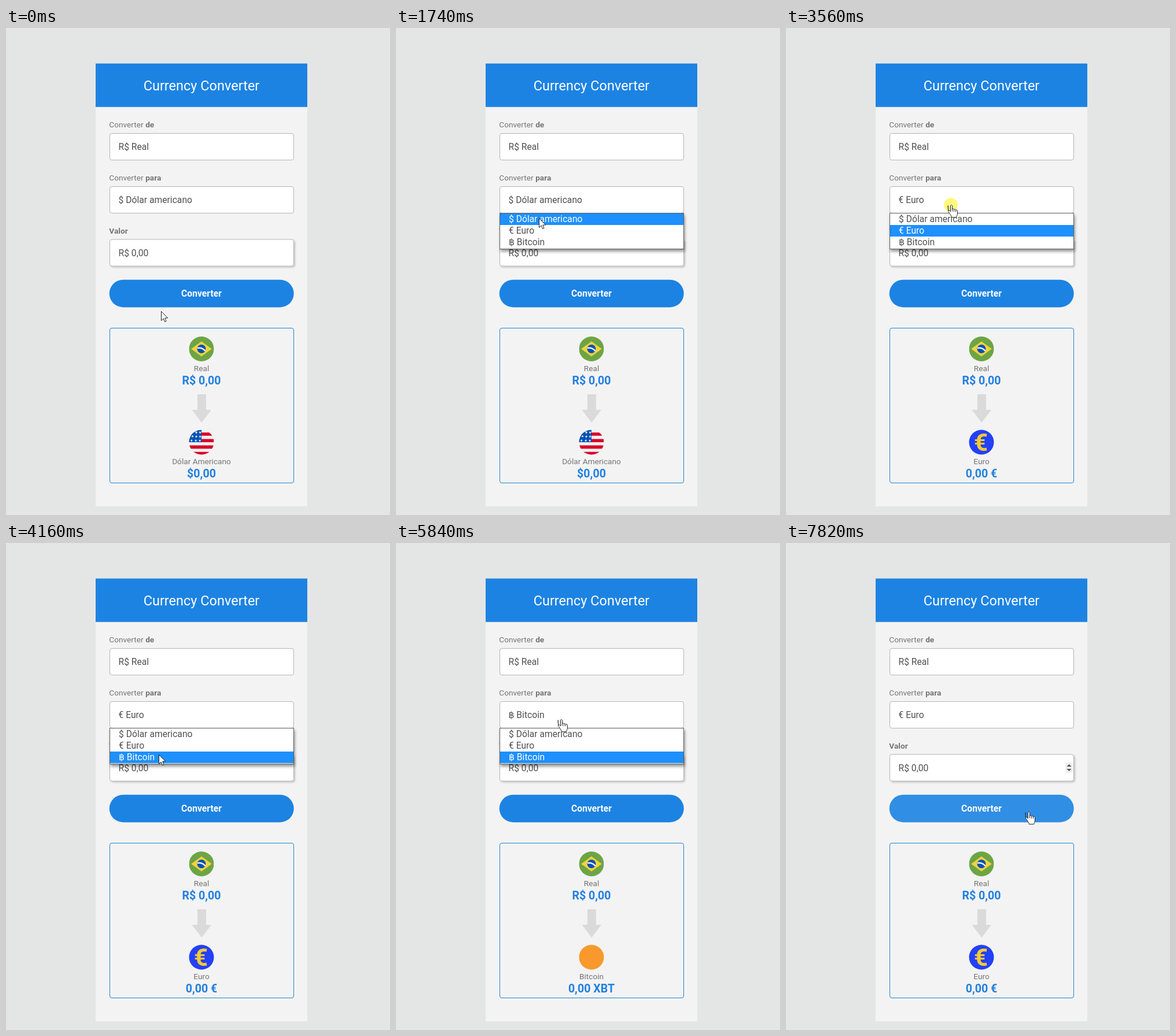
An HTML page that plays this animation: 664x843 px, repeating every 8 s.

```html
<!DOCTYPE html>
<html lang="pt">
<head>
<meta charset="utf-8">
<title>Currency Converter</title>
<style>
  html, body { margin: 0; width: 100%; height: 100%; overflow: hidden; background: #e4e6e5; }
  svg { display: block; width: 100%; height: 100%; font-family: Roboto, "DejaVu Sans", sans-serif; }
  .label { font-size: 13.7px; fill: #757575; }
  .bold { font-weight: 700; }
  .value { font-size: 15.68px; fill: #505050; }
  .money { font-size: 19.6px; font-weight: 700; fill: #217fe0; }
  .mid { text-anchor: middle; }
  .field { fill: #fff; stroke: #b4b4b4; }
  .cursor path { fill: #fff; stroke: #222; stroke-linejoin: round; }
</style>
</head>
<body>
<svg viewBox="0 0 664 843">
  <defs>
    <filter id="fieldShadow" x="-5%" y="-20%" width="110%" height="150%">
      <feDropShadow dx="2" dy="2" stdDeviation="1.5" flood-opacity=".2"/>
    </filter>
    <filter id="menuShadow" x="-5%" y="-20%" width="110%" height="160%">
      <feDropShadow dx="1.5" dy="4" stdDeviation="2.5" flood-opacity=".4"/>
    </filter>
    <clipPath id="disc"><circle cx="256" cy="256" r="256"/></clipPath>
    <path id="star" d="M0-29 7-9H28L11 4 17 24 0 12-17 24-11 4-28-9H-7Z" fill="#fff"/>
  </defs>

  <rect x="155" y="62" width="366" height="766" fill="#f3f3f3"/>
  <rect x="155" y="61.5" width="366" height="75.2" fill="#1c83e3"/>
  <text class="mid" x="338" y="107.5" font-size="23.5" fill="#fff">Currency Converter</text>

  <text class="label" x="178.3" y="172">Converter <tspan class="bold">de</tspan></text>
  <text class="label" x="178.3" y="264">Converter <tspan class="bold">para</tspan></text>
  <text class="label bold" x="178.3" y="356">Valor</text>

  <rect class="field" x="179.5" y="182.5" width="318" height="46" rx="3.5"/>
  <rect class="field" x="179.5" y="274.5" width="318" height="46" rx="3.5"/>
  <rect class="field" x="179.5" y="366" width="318" height="46" rx="3.5" filter="url(#fieldShadow)"/>
  <text class="value" x="194.5" y="211">R$ Real</text>
  <text class="value" x="194.5" y="303" id="choice"></text>
  <text class="value" x="194.5" y="395">R$ 0,00</text>
  <g id="spinner">
    <rect x="483" y="380" width="13" height="18" fill="#efefef"/>
    <path d="M485.5 387 489.5 383 493.5 387ZM485.5 391 489.5 395 493.5 391Z" fill="#505050"/>
  </g>

  <rect id="button" x="178.7" y="435.8" width="319" height="47.6" rx="23.8"/>
  <text class="mid bold" x="338" y="465" font-size="15.68" fill="#fff">Converter</text>

  <rect x="179.5" y="519.5" width="318" height="268" rx="3.5" fill="none" stroke="#1c83d8"/>
  <g transform="translate(316.5 534)scale(.084)" clip-path="url(#disc)">
    <path d="M0 0H512V512H0Z" fill="#6da544"/>
    <path d="M256 100 467 256 256 412 45 256Z" fill="#f5d23f"/>
    <circle cx="256" cy="256" r="89" fill="#0052b4"/>
    <path d="M172 238Q275 222 334 297" fill="none" stroke="#f0f0f0" stroke-width="30"/>
  </g>
  <text class="label mid" x="338" y="594">Real</text>
  <text class="money mid" x="338" y="616.5">R$ 0,00</text>
  <path d="M331 634H346V661H355L338.3 683 321.5 661H331Z" fill="#dadada"/>

  <g class="icon" transform="translate(316.5 695.5)scale(.084)" clip-path="url(#disc)">
    <path d="M0 0H512V512H0Z" fill="#f0f0f0"/>
    <path d="M0 89H512M0 223H512M0 356H512M0 490H512" stroke="#d80027" stroke-width="67"/>
    <path d="M0 0H256V256H0Z" fill="#0052b4"/>
    <use href="#star" x="150" y="55"/><use href="#star" x="228" y="55"/>
    <use href="#star" x="72" y="133"/><use href="#star" x="150" y="139"/><use href="#star" x="228" y="139"/>
    <use href="#star" x="50" y="222"/><use href="#star" x="139" y="222"/><use href="#star" x="222" y="222"/>
  </g>
  <g class="icon">
    <circle cx="338" cy="717" r="21.5" fill="#2340fb"/>
    <text class="mid bold" x="337" y="732" font-size="42" fill="#f6c934">€</text>
  </g>
  <circle class="icon" cx="338" cy="717" r="21.5" fill="#f9992d"/>
  <text class="label mid" x="338" y="755" id="currency"></text>
  <text class="money mid" x="338" y="777.5" id="result"></text>

  <g id="menu">
    <rect x="179.5" y="320.5" width="318" height="62" fill="#fff" stroke="#5a5a5a" filter="url(#menuShadow)"/>
    <rect id="highlight" x="180" width="317" height="20" fill="#1e90ff"/>
    <text class="value option" x="195" y="336"></text>
    <text class="value option" x="195" y="355.8"></text>
    <text class="value option" x="195" y="376"></text>
  </g>

  <circle id="halo" r="12" fill="#fff200" opacity=".5"/>
  <g id="pointer">
    <g class="cursor"><path d="M.5.5V16.5L4.2 13 6.6 18.6 9 17.6 6.7 12H11.7Z"/></g>
    <g class="cursor">
      <path d="M-1.5 2C-1.5 0 1.5 0 1.5 2V8C1.5 6.4 4.5 6.4 4.5 8.4 4.8 7.2 7.5 7.4 7.5 9.2 8 8.2 10.5 8.4 10.5 10.5V15C10.5 18 8.7 19 8.7 21.8H.3C.3 19-2 17-3.5 14.5L-5.3 11.8C-6-10-6 10-5 9.7-4.4 9.4-3.5 9.7-3 10.3L-1.5 12Z"/>
      <path d="M1.5 8V11.5M4.5 8.5V11.8M7.5 9.3V12.2"/>
    </g>
    <g class="cursor">
      <path d="M-3-7.5H-1L0-6.5 1-7.5H3M0-6.5V7M-3 8H-1L0 7 1 8H3" style="fill:none"/>
    </g>
  </g>
</svg>
<script>
  const LOOP = 8000;
  const ARROW = 0, HAND = 1, BEAM = 2;

  const currencies = [
    { option: '$ Dólar americano', name: 'Dólar Americano', amount: '$0,00' },
    { option: '€ Euro', name: 'Euro', amount: '0,00 €' },
    { option: '฿ Bitcoin', name: 'Bitcoin', amount: '0,00 XBT' }
  ];

  // Pointer moves: [start, end, steps, x, y]
  const origin = [268, 490];
  const moves = [
    [80, 690, 9, 248, 304],
    [1550, 1740, 4, 247, 329],
    [1820, 1880, 2, 249, 335],
    [2020, 2150, 3, 251, 347],
    [3030, 3380, 6, 286, 306],
    [3700, 3830, 3, 272, 345],
    [3900, 4160, 5, 264, 366],
    [4890, 5510, 10, 286, 305],
    [5960, 6260, 5, 267, 348],
    [6860, 7000, 3, 269, 388],
    [7290, 7820, 8, 420, 465]
  ];
  const menuOpen = [[1220, 2620], [3490, 4560], [5700, 6800]];
  const clicks = [[1220, 1280], [2550, 2620], [3430, 3620], [4490, 4560], [5640, 5700], [6660, 6800]];
  const selections = [[0, 0], [2620, 1], [4560, 2], [6800, 1]];

  const $ = id => document.getElementById(id);
  const all = selector => [...document.querySelectorAll(selector)];
  const show = (el, on) => { el.style.display = on ? '' : 'none'; };
  const within = (t, spans) => spans.some(([a, b]) => t >= a && t < b);
  const smooth = p => p * p * (3 - 2 * p);

  const icons = all('.icon'), options = all('.option'), cursors = all('.cursor');
  options.forEach((el, i) => { el.textContent = currencies[i].option; });

  function pointerAt(t) {
    let [x, y] = origin;
    for (const [start, end, steps, toX, toY] of moves) {
      if (t < start) break;
      const step = Math.floor((t - start) / (end - start) * (steps - 1) + 1e-6) + 1;
      const p = smooth(Math.min(1, step / steps));
      x += (toX - x) * p;
      y += (toY - y) * p;
    }
    return [Math.round(x), Math.round(y)];
  }

  function render(t) {
    const [x, y] = pointerAt(t);
    const open = within(t, menuOpen);
    const selected = selections.filter(([start]) => t >= start).pop()[1];
    const overSelect = y >= 274 && y <= 320;
    const overInput = !open && y >= 366 && y <= 412;
    const overButton = y >= 436 && y <= 483;

    $('choice').textContent = currencies[selected].option;
    $('currency').textContent = currencies[selected].name;
    $('result').textContent = currencies[selected].amount;
    icons.forEach((el, i) => show(el, i === selected));

    const row = y > 320 ? Math.min(2, Math.floor((y - 321) / 20)) : selected;
    show($('menu'), open);
    $('highlight').setAttribute('y', 321 + row * 20);
    options.forEach((el, i) => { el.style.fill = i === row ? '#fff' : ''; });

    show($('spinner'), overInput || t >= 6900);
    $('button').setAttribute('fill', overButton ? '#308ee4' : '#1c83e3');

    const kind = overInput ? BEAM : overSelect || overButton ? HAND : ARROW;
    cursors.forEach((el, i) => show(el, i === kind));
    $('pointer').setAttribute('transform', `translate(${x} ${y})`);
    show($('halo'), within(t, clicks));
    $('halo').setAttribute('transform', `translate(${x - 1} ${y})`);
  }

  const begin = performance.now();
  function tick() {
    render((performance.now() - begin) % LOOP);
    requestAnimationFrame(tick);
  }
  tick();
</script>
</body>
</html>
```
